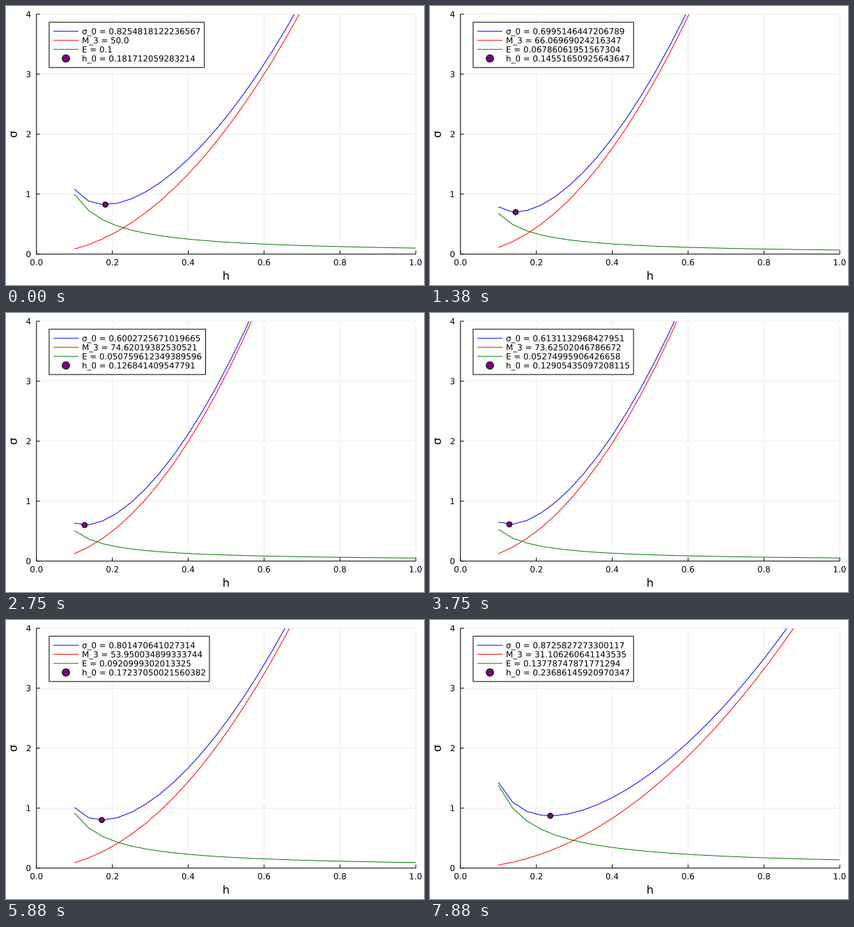
A matplotlib script for the animation above (8000 ms loop, 600 by 400 pixels).

```python
import math

import numpy as np
import matplotlib.pyplot as plt
from matplotlib.animation import FuncAnimation
from matplotlib.patches import Circle, PathPatch, Rectangle
from matplotlib.path import Path
from matplotlib.textpath import TextPath

W, H, DPI = 600, 400, 100
FRAMES, INTERVAL = 64, 125
LEFT, RIGHT, TOP, BOTTOM = 43.7, 588.19, 11.81, 355.7
PX = 72 / DPI
SMALL, LARGE = 11.85, 16.3
HALF_CAP = 0.365 * SMALL
GRID = "#ededed"
COLORS = ("blue", "red", "green")

plt.rcParams.update({
    "font.family": "DejaVu Sans",
    "path.simplify": False,
    "path.snap": False,
    "lines.solid_capstyle": "butt",
})

fig = plt.figure(figsize=(W / DPI, H / DPI), dpi=DPI, facecolor="white")
ax = fig.add_axes([0, 0, 1, 1])
ax.set(xlim=(0, W), ylim=(H, 0))
ax.axis("off")


def px(h):
    return LEFT + (RIGHT - LEFT) * h


def py(s):
    return BOTTOM - (BOTTOM - TOP) * s / 4


def line(xs, ys, color="black", **kw):
    return ax.plot(xs, ys, color=color, lw=PX, **kw)[0]


def dot(x, y, r, z):
    return ax.add_patch(Circle((x, y), r, fc="purple", ec="black", lw=PX, zorder=z))


def outline(x, y, text, size=SMALL, align=0.0, upward=False):
    """Glyph outlines with the baseline at (x, y); align 0 is left, 1 is right."""
    path = TextPath((0, 0), text, size=size)
    ext = path.get_extents()
    u = path.vertices[:, 0] - align * (ext.x0 + ext.x1)
    v = path.vertices[:, 1]
    xy = (x - v, y - u) if upward else (x + u, y - v)
    return Path(np.column_stack(xy), path.codes)


def label(*args, z=4, **kw):
    return ax.add_patch(PathPatch(outline(*args, **kw), fc="black", lw=0, zorder=z))


# Grid, axes and ticks
for i in range(6):
    x = px(i / 5)
    line([x, x], [TOP, BOTTOM], GRID, zorder=0)
    line([x, x], [BOTTOM, BOTTOM - 5], zorder=4)
    label(x, 367.4 + HALF_CAP, f"{i / 5:.1f}", align=0.5)
for i in range(5):
    y = py(i)
    line([LEFT, RIGHT], [y, y], GRID, zorder=0)
    line([LEFT, LEFT + 5], [y, y], zorder=4)
    label(36, y + HALF_CAP, str(i), align=1)
line([LEFT, LEFT], [TOP, BOTTOM], zorder=4)
line([LEFT, RIGHT], [BOTTOM, BOTTOM], zorder=4)
label(px(0.5), 392.4, "h", LARGE, align=0.5)
label(15.6, py(2), "σ", LARGE, align=0.5, upward=True)

# Curves and minimum
clip = Rectangle((LEFT, TOP), RIGHT - LEFT, BOTTOM - TOP, transform=ax.transData)
curves = [line([], [], c, zorder=2) for c in COLORS]
for c in curves:
    c.set_clip_path(clip)
point = dot(0, 0, 3.8, 3)

# Legend
BOX_X, BOX_Y, ROW, TEXT_X = 61.9, 23.2, 13, 109
rows = [BOX_Y + ROW * (i + 1) for i in range(4)]
box = ax.add_patch(Rectangle((BOX_X, BOX_Y), 230, 5 * ROW,
                             fc="white", ec="black", lw=PX, zorder=5))
for y, c in zip(rows, COLORS):
    line([68, 104], [y, y], c, zorder=6)
dot(86, rows[3], 5.3, 6)
entries = [label(TEXT_X, y, "0", z=6) for y in rows]

h = np.linspace(0.1, 1, 25)


def draw(n):
    s = math.sin(2 * math.pi * n / 99)
    m, e = 50 * (1 + s / 2), 0.1 * (1 - s / 2)
    h0 = float(np.cbrt(3 * e / m))
    s0 = e / h0 + m * h0**2 / 6
    falling, rising = e / h, m * h**2 / 6
    for c, ys in zip(curves, (falling + rising, rising, falling)):
        c.set_data(px(h), py(ys))
    point.center = px(h0), py(s0)

    names = ("σ_0", "M_3", "E", "h_0")
    end = 0
    for t, y, name, v in zip(entries, rows, names, (s0, m, e, h0)):
        path = outline(TEXT_X, y + HALF_CAP, f"{name} = {v}")
        t.set_path(path)
        end = max(end, path.get_extents().x1)
    box.set_width(end + 6.3 - BOX_X)
    return [*curves, point, box, *entries]


anim = FuncAnimation(fig, draw, frames=FRAMES, interval=INTERVAL, repeat=True, repeat_delay=0)
plt.show()
```
